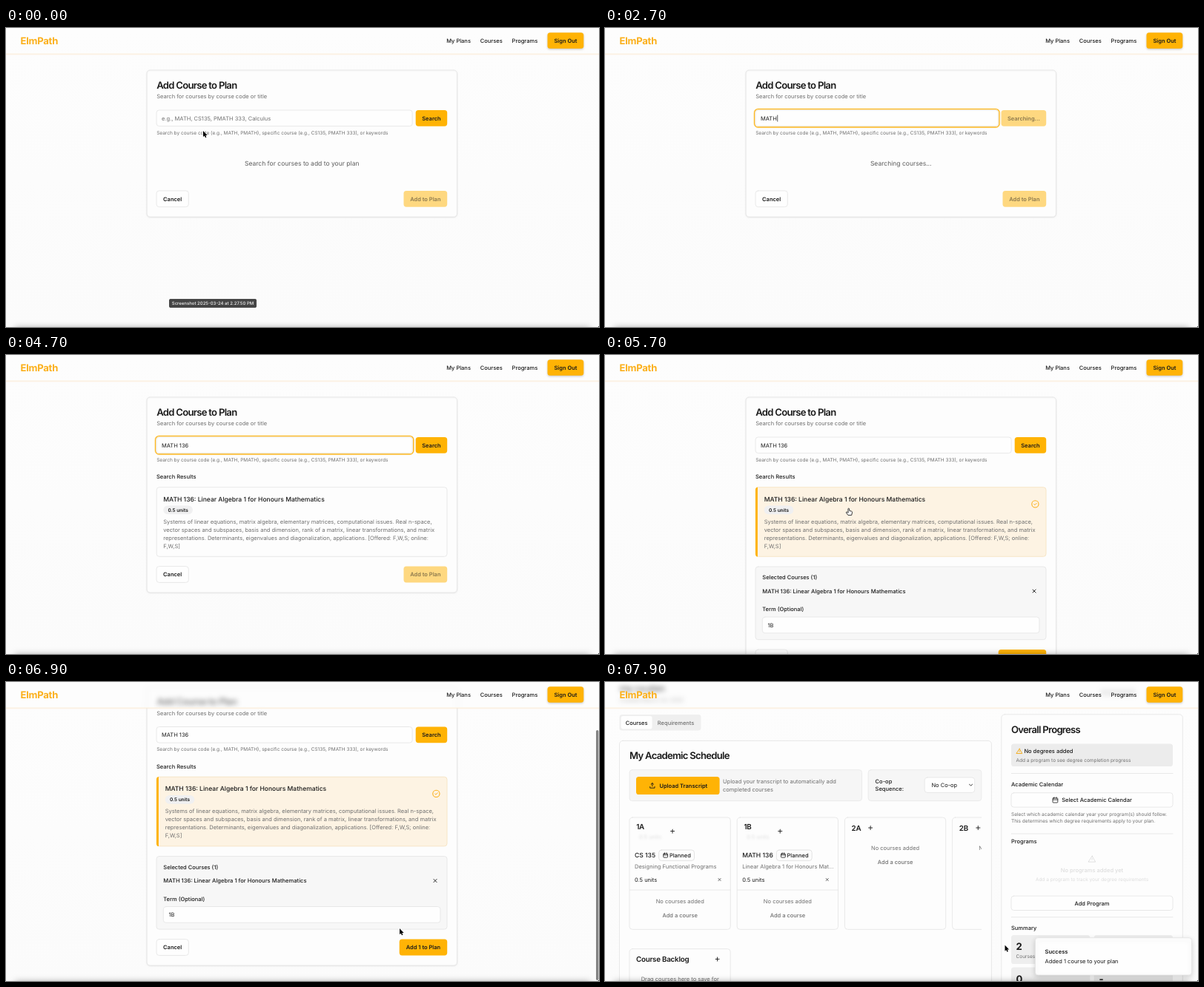
Animation, 800 px wide and 404 px high, one loop 8000 ms. Source, as an HTML page with a canvas:

```html
<!DOCTYPE html>
<html lang="en">
<head>
<meta charset="utf-8">
<title>Course planner</title>
<style>
  html, body { margin: 0; width: 100%; height: 100%; overflow: hidden; background: #fcfcfc; }
  canvas { display: block; width: 800px; height: 404px; }
</style>
</head>
<body>
<canvas id="stage"></canvas>
<script>
const W = 800, H = 404, LOOP = 8000, STEP = 100;
const SM = 7.5, XS = 6.51, MD = 8.54, LG = 9.8, XL = 13.1;
const INK = '#1a1a1a', GREY = '#6f6f6f', LINE = '#e4e4e4', GOLD = '#ffb305', CARD = '#fdfdfd';
const dpr = window.devicePixelRatio || 1;

const stage = document.getElementById('stage');
const page = document.createElement('canvas');
for (const cv of [stage, page]) { cv.width = W * dpr; cv.height = H * dpr; }
const main = stage.getContext('2d'), sheet = page.getContext('2d');
let c = main;

const clamp = v => Math.max(0, Math.min(1, v));
const ease = v => v * v * (3 - 2 * v);
const span = (t, a, b) => ease(clamp((t - a) / (b - a)));

// Text placed by the middle of its capitals
function text(s, x, y, size = SM, weight = 400, color = INK, align = 'left', track = 0) {
  c.font = `${weight} ${size}px Inter, "Liberation Sans", sans-serif`;
  c.letterSpacing = track * size + 'px';
  c.textAlign = align;
  c.fillStyle = color;
  c.fillText(s, x, y + size * 0.364);
  c.letterSpacing = '0px';
}
const mid = (s, x, y, size, weight, color) => text(s, x, y, size, weight, color, 'center');
const heading = (s, x, y, size = XL, track = -0.055) => text(s, x, y, size, 600, INK, 'left', track);

function box(x0, y0, x1, y1, fill, stroke, r = 3.6, width = 0.8) {
  c.beginPath();
  c.roundRect(x0, y0, x1 - x0, y1 - y0, r);
  if (fill) { c.fillStyle = fill; c.fill(); }
  if (stroke) { c.strokeStyle = stroke; c.lineWidth = width; c.stroke(); }
}
function shadowed(blur, dy, color, draw) {
  c.save();
  c.shadowColor = color;
  c.shadowBlur = blur * dpr;
  c.shadowOffsetY = dy * dpr;
  draw();
  c.restore();
}
function path(points, color = INK, width = 0.9, closed = false) {
  c.beginPath();
  points.forEach(([x, y]) => c.lineTo(x, y));
  if (closed) c.closePath();
  c.strokeStyle = color;
  c.lineWidth = width;
  c.lineCap = c.lineJoin = 'round';
  c.stroke();
}
const rule = (x0, x1, y, color = LINE) => path([[x0, y], [x1, y]], color, 0.8);
function plus(x, y, r = 2.6) {
  path([[x - r, y], [x + r, y]]);
  path([[x, y - r], [x, y + r]]);
}
function cross(x, y, r, color = INK) {
  path([[x - r, y - r], [x + r, y + r]], color);
  path([[x - r, y + r], [x + r, y - r]], color);
}
function calendar(x, y, r) {
  box(x - r, y - r * 0.8, x + r, y + r, null, INK, 0.8, 0.8);
  rule(x - r, x + r, y - r * 0.15, INK);
  for (const d of [-0.45, 0.45]) path([[x + d * r, y - r * 1.2], [x + d * r, y - r * 0.6]], INK, 0.8);
}
function warning(x, y, r, color) {
  path([[x, y - r], [x + r, y + r * 0.8], [x - r, y + r * 0.8]], color, 0.9, true);
  path([[x, y - r * 0.25], [x, y + r * 0.2]], color, 0.8);
}
function button(x0, x1, y, label, on = true) {
  c.save();
  if (!on) c.globalAlpha = 0.5;
  box(x0, y - 10.9, x1, y + 10.9, GOLD);
  mid(label, (x0 + x1) / 2, y, SM, 600);
  c.restore();
}
function outline(x0, x1, y, h, label) {
  box(x0, y - h, x1, y + h, '#fefefe', LINE);
  if (label) mid(label, (x0 + x1) / 2, y, SM, 600);
}

function backdrop() {
  const g = c.createLinearGradient(0, 0, 0, H);
  g.addColorStop(0, '#fdfdfd');
  g.addColorStop(1, '#fbfbfb');
  c.fillStyle = g;
  c.fillRect(0, 0, W, H);
}

const FOCUS = 1300, KEYS = [2100, 2200, 2400, 2600, 3000, 3500, 3700, 3900];

function searchRow(t) {
  const pressed = KEYS.filter(k => t >= k);
  const busy = t >= 2700 && t < 4400;
  const focus = t >= FOCUS && t < 5300;
  const right = busy ? 530.5 : 548.2;
  if (focus) {
    box(200.8, 108.8, right + 2.4, 134.8, null, '#fdeecb', 5.6, 1);
    box(201.6, 109.6, right + 1.5, 134, '#fff', '#fbb51c', 4.8, 1.3);
  }
  box(203, 111, right, 132.6, '#fefefe', focus ? '#e9e4da' : LINE);
  const value = 'MATH 136'.slice(0, pressed.length);
  text(value || 'e.g., MATH, CS135, PMATH 333, Calculus', 210, 122, SM, 400, value ? INK : GREY);
  const active = pressed.length ? pressed[pressed.length - 1] : FOCUS;
  if (focus && (t - active) % 1000 < 500) {
    const x = 210.4 + (value ? c.measureText(value).width + 0.6 : 0);
    path([[x, 117.8], [x, 126.2]], INK, 0.7);
  }
  button(busy ? 534.5 : 552.7, 595.2, 121.8, busy ? 'Searching...' : 'Search', !busy);
  return busy;
}

const ABOUT = [
  'Systems of linear equations, matrix algebra, elementary matrices, computational issues. Real n-space,',
  'vector spaces and subspaces, basis and dimension, rank of a matrix, linear transformations, and matrix',
  'representations. Determinants, eigenvalues and diagonalization, applications. [Offered: F,W,S; online:',
  'F,W,S]'
];
const COURSE = 'MATH 136: Linear Algebra 1 for Honours Mathematics';

function result(picked) {
  text('Search Results', 203, 164.5, SM, 500);
  box(203.2, 178.7, 595, 272.3, picked ? '#fdf3e3' : '#fdfdfd', picked ? '#f5e1bd' : LINE);
  if (picked) {
    c.save();
    box(203, 178.5, 595, 272.5);
    c.clip();
    c.fillStyle = GOLD;
    c.fillRect(203, 178, 2.9, 95);
    c.restore();
    c.beginPath();
    c.arc(580.4, 201.4, 4.6, 0, 7);
    c.strokeStyle = '#fbb01c';
    c.lineWidth = 1.1;
    c.stroke();
    path([[578.7, 201.5], [579.9, 202.7], [582.2, 200.3]], '#fbb01c', 1);
  }
  const x = picked ? 214.7 : 212.3;
  text(COURSE, x, 194.7, MD, 500);
  box(x, 203.4, x + 39.6, 215.2, '#f0f0f1', null, 6);
  mid('0.5 units', x + 19.8, 209.4, XS, 600);
  ABOUT.forEach((s, i) => text(s, x, 225.2 + i * 10.9, SM, 400, GREY));
}

function selection() {
  box(203, 286, 595, 384.6, '#f7f7f7', LINE);
  text('Selected Courses (1)', 212.3, 300.4, SM, 500);
  text(COURSE, 212.3, 319, 7.58, 500);
  cross(579, 319, 2.1);
  text('Term (Optional)', 212.3, 343.5, SM, 500);
  box(212.3, 354, 586, 375.7, '#fefefe', LINE);
  text('1B', 219.5, 365.1);
}

function addPage(t, scroll) {
  const found = t >= 4400, picked = t >= 5300;
  const bottom = picked ? 433.5 : found ? 321 : 255.3;
  c.save();
  c.translate(0, -scroll);
  shadowed(2, 0.6, 'rgba(0,0,0,.07)', () => box(190, 57, 608.6, bottom, CARD, LINE, 4.4));
  heading('Add Course to Plan', 203.2, 77.2);
  text('Search for courses by course code or title', 203.2, 92.3, SM, 400, GREY);
  const busy = searchRow(t);
  text('Search by course code (e.g., MATH, PMATH), specific course (e.g., CS135, PMATH 333), or keywords',
    203.2, 141.6, XS, 400, GREY);
  if (found) result(picked);
  else mid(busy ? 'Searching courses...' : 'Search for courses to add to your plan', 399.2, 183.2, MD, 400, '#5c5c5c');
  if (picked) selection();
  const y = bottom - 24.5;
  outline(203, 246.3, y, 10.9, 'Cancel');
  button(picked ? 530.7 : 536.5, 595.2, y, picked ? 'Add 1 to Plan' : 'Add to Plan', picked);
  c.restore();
}

function emptyTerm(x, y) {
  mid('No courses added', x, y, SM, 400, GREY);
  mid('Add a course', x, y + 19.6, SM, 500, GREY);
}

function term(x, name, code, title, reveal) {
  const filled = !!code;
  box(x, 183, x + 136.3, 334.3, CARD, LINE, 4);
  heading(name, x + 9.2, filled ? 195.2 : 197, LG, -0.025);
  plus(x + (filled ? 58 : 34.7), filled ? 201.6 : 197);
  if (!filled) return emptyTerm(x + 68.2, 224);
  c.save();
  c.globalAlpha = reveal;
  c.filter = `blur(${1.6 * dpr}px)`;
  text('0.5 units', x + 13, 209, SM, 400, GREY);
  c.restore();
  text(code, x + 7, 234.2, MD, 500);
  const bx = x + 11.6 + c.measureText(code).width;
  box(bx, 227, bx + 47.8, 241.4, null, '#dcdcdc', 3.6);
  calendar(bx + 9, 234.2, 2.9);
  text('Planned', bx + 14.2, 234.2, SM, 500);
  text(title, x + 7, 249.7, SM, 400, GREY);
  text('0.5 units', x + 7, 267);
  cross(x + 121.5, 267, 1.6, '#555');
  rule(x, x + 136.3, 281);
  emptyTerm(x + 68.2, 296);
}

function schedule(reveal) {
  box(19.5, 44, 129.5, 65.6, '#efefef');
  box(21.6, 46, 63.6, 63.6, '#fefefe', null, 3);
  mid('Courses', 42.6, 55, SM, 500);
  mid('Requirements', 95.6, 55, SM, 500, GREY);

  box(19.5, 79.4, 521.4, 430, CARD, LINE, 4.4);
  heading('My Academic Schedule', 33, 99.6);
  box(33, 118.7, 346.5, 160.6, '#f6f6f6', '#e8e8e8');
  box(42, 128, 154.6, 152, GOLD);
  path([[60.7, 141.3], [60.7, 143.2], [67, 143.2], [67, 141.3]]);
  path([[63.8, 141], [63.8, 136.6]]);
  path([[62, 138.3], [63.8, 136.5], [65.6, 138.3]]);
  text('Upload Transcript', 73.4, 140, SM, 600);
  text('Upload your transcript to automatically add', 159, 134.5, SM, 400, GREY);
  text('completed courses', 159, 145.3, SM, 400, GREY);
  box(355.2, 118.7, 507.8, 160.6, '#f6f6f6', '#e8e8e8');
  text('Co-op', 364.6, 134, SM, 500);
  text('Sequence:', 364.6, 144.6, SM, 500);
  box(431.2, 129, 498.7, 149.4, '#fefefe', LINE);
  text('No Co-op', 440.4, 139.3);
  path([[491.6, 138.2], [493.6, 140.2], [495.6, 138.2]]);

  c.save();
  c.beginPath();
  c.rect(32, 180, 476, 160);
  c.clip();
  term(33, '1A', 'CS 135', 'Designing Functional Programs', reveal);
  term(178.2, '1B', 'MATH 136', 'Linear Algebra 1 for Honours Mat...', reveal);
  term(323.4, '2A');
  term(468.6, '2B');
  c.restore();

  box(33, 360.6, 169.2, 430, CARD, LINE, 4);
  heading('Course Backlog', 42, 374.5, LG, -0.025);
  plus(151.5, 374.4);
  mid('Drag courses here to save for', 101.2, 401.6, SM, 400, GREY);
}

function progress(reveal) {
  const L = 548, R = 766, C = 657;
  box(534.8, 43.8, 779.3, 430, CARD, LINE, 4.4);
  heading('Overall Progress', L, 64.6);
  box(L, 83.5, R, 114, '#ececec');
  warning(559, 93.6, 3.7, '#f5a80c');
  text('No degrees added', 565.4, 93.6, SM, 500);
  text('Add a program to see degree completion progress', 554.5, 105.5, XS, 400, GREY);
  for (const y of [123.5, 205, 317.7]) rule(L, R, y);
  text('Academic Calendar', L, 138, SM, 500);
  outline(L, R, 159.4, 9.7);
  calendar(607.4, 159.6, 3.4);
  text('Select Academic Calendar', 616.2, 159.4, SM, 500);
  text('Select which academic calendar year your program(s) should follow.', L, 178.2, XS, 400, GREY);
  text('This determines which degree requirements apply to your plan.', L, 187.2, XS, 400, GREY);
  text('Programs', L, 215, SM, 500);
  c.save();
  c.globalAlpha = reveal;
  warning(C, 239.4, 4.6, GREY);
  mid('No programs added yet', C, 254, SM, 500, GREY);
  mid('Add a program to track your degree requirements', C, 266.5, XS, 400, GREY);
  c.restore();
  outline(L, R, 298.8, 9.7);
  mid('Add Program', C, 298.8, SM, 500);
  text('Summary', L, 332, SM, 500);
  for (const y of [342, 385.5]) {
    box(L, y, 654.3, y + 39, '#eeeeee');
    box(659.7, y, R, y + 39, '#eeeeee');
  }
  text('2', 554.6, 357.5, XL, 700);
  text('Courses', 554.6, 370.8, XS, 400, GREY);
  text('0', 554.6, 401.5, XL, 700);
  text('-', 666.4, 401.5, XL, 700);
}

function planPage(t) {
  const reveal = 0.22 * clamp((t - 7400) / 500);
  heading('my ca plan', 19.5, 8);
  text('Created March 24, 2025', 19.5, 24, SM, 400, GREY);
  box(668, 9, 716, 19, '#dedede');
  schedule(reveal);
  progress(reveal);
}

function toast(t) {
  const dy = 60 * (1 - span(t, 7500, 7800));
  c.save();
  c.translate(0, dy);
  shadowed(7, 2.5, 'rgba(0,0,0,.16)', () => box(580.5, 345.6, 791.5, 396, '#fefefe', LINE));
  text('Success', 593.5, 364.4, SM, 600);
  text('Added 1 course to your plan', 593.5, 377.4);
  c.restore();
}

function header(frosted) {
  c.save();
  c.beginPath();
  c.rect(0, 0, W, 35);
  c.clip();
  if (frosted) {
    c.fillStyle = '#fdfdfd';
    c.fillRect(0, 0, W, 35);
    c.filter = `blur(${3 * dpr}px)`;
    c.drawImage(page, 0, 0, W, H);
    c.filter = 'none';
  }
  c.fillStyle = 'rgba(254,254,254,.5)';
  c.fillRect(0, 0, W, 35);
  c.restore();
  c.fillStyle = '#fbead3';
  c.fillRect(0, 34.6, W, 0.9);
  c.fillStyle = 'rgba(250,225,190,.25)';
  c.fillRect(0, 35.5, W, 1);
  text('ElmPath', 19.5, 17.2, XL, 700, '#fbb01c', 'left', -0.02);
  text('My Plans', 594.2, 17, SM, 500);
  text('Courses', 639.8, 17, SM, 500);
  text('Programs', 682.6, 17, SM, 500);
  shadowed(3, 1.2, 'rgba(0,0,0,.2)', () => box(730.5, 6.2, 779.3, 27.8, GOLD));
  mid('Sign Out', 754.9, 17, SM, 600);
}

function overlay(t, scroll) {
  if (t >= 5900 && t < 7500) {
    const y = 1 + 64 * scroll / 50.5;
    box(796, y, 799.4, y + 338, '#838383', null, 1.7);
  }
  // Soft shade rising from below the bottom edge
  shadowed(10, 0, 'rgba(0,0,0,.35)', () => {
    c.fillStyle = '#000';
    c.fillRect(12, H + 1, W - 24, 30);
  });
  c.fillStyle = '#333';
  c.fillRect(799, 403, 1, 1);
  if (t < FOCUS) {
    box(220.5, 366.6, 337.5, 377.4, '#454545', '#2f2f2f', 1, 0.8);
    mid('Screenshot 2025-03-24 at 2.27.50 PM', 279, 372, 6, 500, '#f4f4f4');
  }
}

// time, x, y of the pointer tip
const MOVES = [
  [0, 266, 139], [700, 266, 139], [1200, 261.5, 122], [4800, 261.5, 122], [5200, 328.7, 207.4],
  [6500, 328.7, 207.4], [6900, 531, 333], [7200, 553, 357], [7500, 553, 357], [7800, 539.5, 355.5],
  [LOOP, 539.5, 355.5]
];
function pointer(t) {
  if (t >= KEYS[0] && t < 4800) return;
  const i = MOVES.findIndex(m => m[0] > t);
  const a = MOVES[i - 1], b = MOVES[i], k = span(t, a[0], b[0]);
  const hand = (t >= 5100 && t < 6600) || (t >= 7100 && t < 7500);
  c.save();
  c.translate(a[1] + (b[1] - a[1]) * k, a[2] + (b[2] - a[2]) * k);
  const shape = new Path2D(hand
    ? 'M-.8.3Q0-.7.8.3L1.2 3.2 3.6 3.6Q5 4 4.8 5.4L4 9H-.8L-3.3 5.6Q-3.4 4.4-2.2 4.7L-.6 5.8Z'
    : 'M0 0V8L1.8 6.4 3 9.2 4.4 8.6 3.2 5.9H5.7Z');
  c.lineJoin = 'round';
  c.strokeStyle = hand ? '#222' : '#fff';
  c.lineWidth = hand ? 0.9 : 1.3;
  c.fillStyle = hand ? '#fff' : '#000';
  if (hand) { c.fill(shape); c.stroke(shape); }
  else { c.stroke(shape); c.fill(shape); }
  c.restore();
}

function draw(t) {
  const scroll = 50.5 * span(t, 5900, 6400);
  const done = t >= 7500;
  c = sheet;
  c.setTransform(dpr, 0, 0, dpr, 0, 0);
  c.textRendering = 'geometricPrecision';
  backdrop();
  if (done) planPage(t);
  else addPage(t, scroll);

  c = main;
  c.setTransform(dpr, 0, 0, dpr, 0, 0);
  c.textRendering = 'geometricPrecision';
  c.drawImage(page, 0, 0, W, H);
  header(done || scroll > 0);
  if (done) toast(t);
  overlay(t, scroll);
  pointer(t);
}

const start = performance.now();
function tick() {
  const t = (performance.now() - start) % LOOP;
  draw(Math.floor(t / STEP) * STEP);
  requestAnimationFrame(tick);
}
tick();
</script>
</body>
</html>
```
